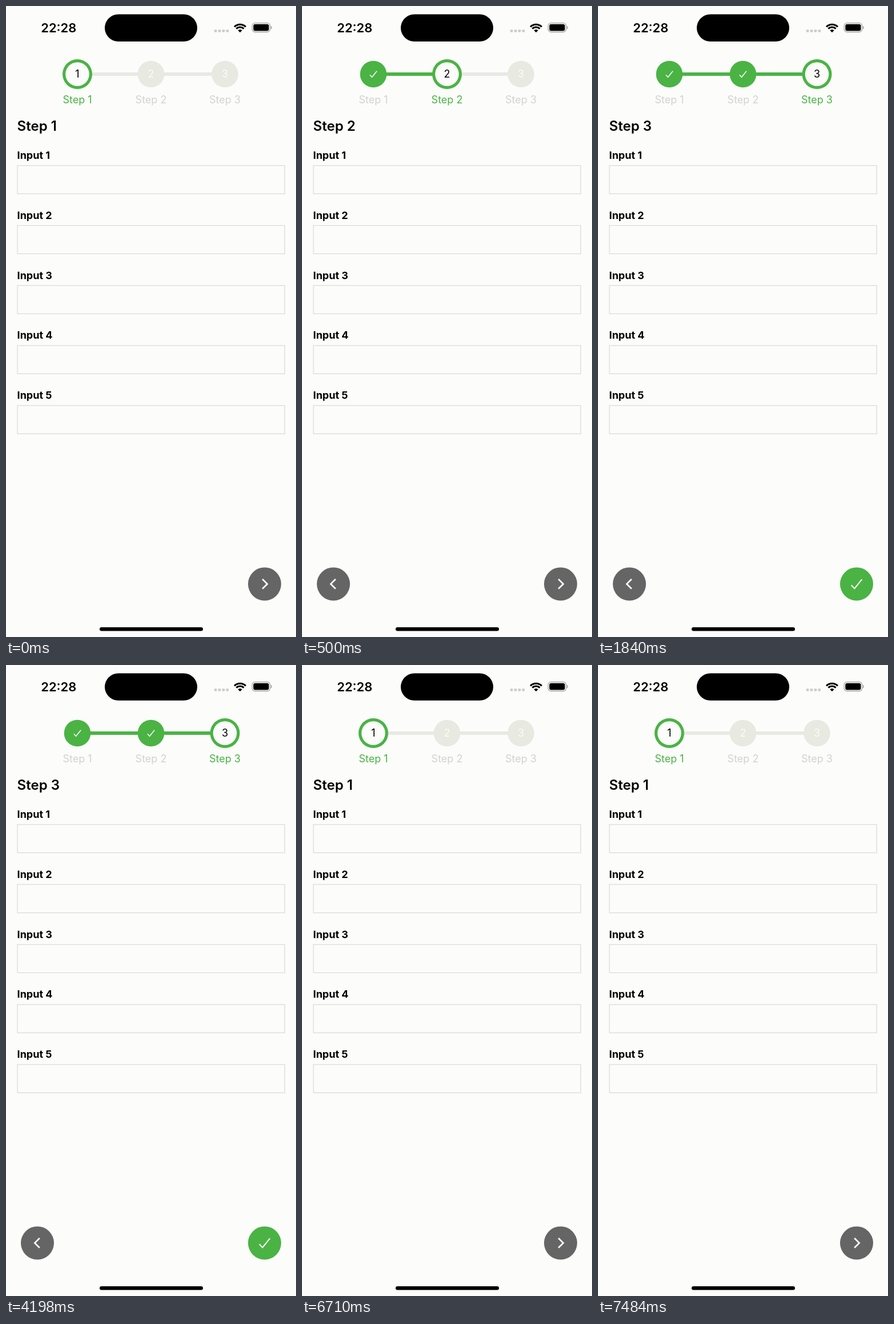
Recreate the animation shown at these times as an HTML page with a canvas. Size 508 by 1102 pixels, loop 8000 ms.

```html
<!DOCTYPE html>
<html lang="en">
<head>
<meta charset="utf-8">
<title>Step form</title>
<style>
html, body { margin: 0; width: 100%; height: 100%; overflow: hidden; background: #fcfcfb; }
canvas { display: block; width: 508px; height: 1102px; }
</style>
</head>
<body>
<canvas id="stage"></canvas>
<script>
const W = 508, H = 1102, LOOP = 8000;
const BG = '#fcfcfb', GREEN = '#4ab344', PALE = '#e8e9e1', MUTED = '#d2d2d2', GREY = '#656565';
const STEP_X = [125, 254, 383.5], STEP_Y = 119;
// [start time, active step]
const TIMELINE = [[0, 1], [500, 2], [1840, 3], [5770, 2], [6710, 1]];

const canvas = document.getElementById('stage');
const ctx = canvas.getContext('2d');
const dpr = window.devicePixelRatio || 1;
canvas.width = W * dpr;
canvas.height = H * dpr;

function text(str, x, y, size, weight, color, align = 'left') {
  ctx.font = `${weight} ${size}px Inter, Roboto, sans-serif`;
  ctx.textAlign = align;
  ctx.fillStyle = color;
  ctx.fillText(str, x, y);
}

function disc(x, y, r, color) {
  ctx.fillStyle = color;
  ctx.beginPath();
  ctx.arc(x, y, r, 0, Math.PI * 2);
  ctx.fill();
}

function pill(x, y, w, h, r, color) {
  ctx.fillStyle = color;
  ctx.beginPath();
  ctx.roundRect(x, y, w, h, r);
  ctx.fill();
}

function line(points, width, color) {
  ctx.strokeStyle = color;
  ctx.lineWidth = width;
  ctx.beginPath();
  points.forEach(([x, y]) => ctx.lineTo(x, y));
  ctx.stroke();
}

function check(x, y, s, width) {
  line([[x - 9 * s, y + 2 * s], [x - 3.6 * s, y + 7.8 * s], [x + 9 * s, y - 7.8 * s]], width, '#fff');
}

function wifi(x, y) {
  const a = Math.PI / 4;
  ctx.strokeStyle = '#000';
  ctx.lineWidth = 3;
  for (const r of [9.2, 14]) {
    ctx.beginPath();
    ctx.arc(x, y, r, -Math.PI / 2 - a, -Math.PI / 2 + a);
    ctx.stroke();
  }
  ctx.fillStyle = '#000';
  ctx.beginPath();
  ctx.moveTo(x, y);
  ctx.arc(x, y, 5.2, -Math.PI / 2 - a, -Math.PI / 2 + a);
  ctx.fill();
}

function battery() {
  ctx.strokeStyle = '#a4a4a4';
  ctx.lineWidth = 1.3;
  ctx.beginPath();
  ctx.roundRect(431.2, 29.7, 31.4, 15.8, 5);
  ctx.stroke();
  pill(433.3, 31.8, 27.2, 11.6, 3.2, '#000');
  pill(464, 35, 1.7, 5.4, [0, 2, 2, 0], '#a4a4a4');
}

function statusBar() {
  text('22:28', 92.3, 46, 22, 600, '#000', 'center');
  pill(173, 14.5, 162, 47.5, 23.75, '#000');
  for (let i = 0; i < 4; i++) pill(364.8 + i * 6.9, 41.2, 4.6, 4.6, 1.2, '#cbcbcb');
  wifi(410, 46.3);
  battery();
}

function stepper(active) {
  for (let i = 0; i < 2; i++) {
    line([[STEP_X[i], STEP_Y], [STEP_X[i + 1], STEP_Y]], 6, i + 1 < active ? GREEN : PALE);
  }
  STEP_X.forEach((x, i) => {
    const n = i + 1, on = n === active;
    if (on) {
      disc(x, STEP_Y, 26, GREEN);
      disc(x, STEP_Y, 20.8, BG);
    } else {
      disc(x, STEP_Y, 23.3, n < active ? GREEN : PALE);
    }
    if (n < active) check(x, STEP_Y, 0.68, 1.5);
    else text(n, x, STEP_Y + 6.3, 18, 400, on ? '#000' : '#fbfbf9', 'center');
    text('Step ' + n, x, 169.8, 18, 400, on ? GREEN : MUTED, 'center');
  });
}

function form(active) {
  text('Step ' + active, 19.6, 217.7, 24, 600, '#000');
  for (let i = 0; i < 5; i++) {
    const y = i * 104.8;
    text('Input ' + (i + 1), 19.6, 267 + y, 18, 700, '#000');
    ctx.strokeStyle = '#dcdcdb';
    ctx.lineWidth = 1.3;
    ctx.strokeRect(20, 278.6 + y, 468.3, 49.3);
  }
}

function arrowButton(x, dir) {
  const y = 1009.4, tip = x + 4.6 * dir, back = x - 3.8 * dir;
  disc(x, y, 29, GREY);
  line([[back, y - 8.4], [tip, y], [back, y + 8.4]], 2.7, '#fff');
}

function buttons(active) {
  if (active > 1) arrowButton(55, -1);
  if (active < 3) {
    arrowButton(453, 1);
  } else {
    disc(453, 1009.4, 29, GREEN);
    check(453, 1009.4, 1.03, 2);
  }
}

function draw(t) {
  const active = TIMELINE.filter(([start]) => start <= t).pop()[1];
  ctx.setTransform(dpr, 0, 0, dpr, 0, 0);
  ctx.fillStyle = BG;
  ctx.fillRect(0, 0, W, H);
  statusBar();
  stepper(active);
  form(active);
  buttons(active);
  pill(164, 1085, 181, 6.6, 3.3, '#000');
}

const begin = performance.now();
function tick() {
  draw((performance.now() - begin) % LOOP);
  requestAnimationFrame(tick);
}
tick();
</script>
</body>
</html>
```
